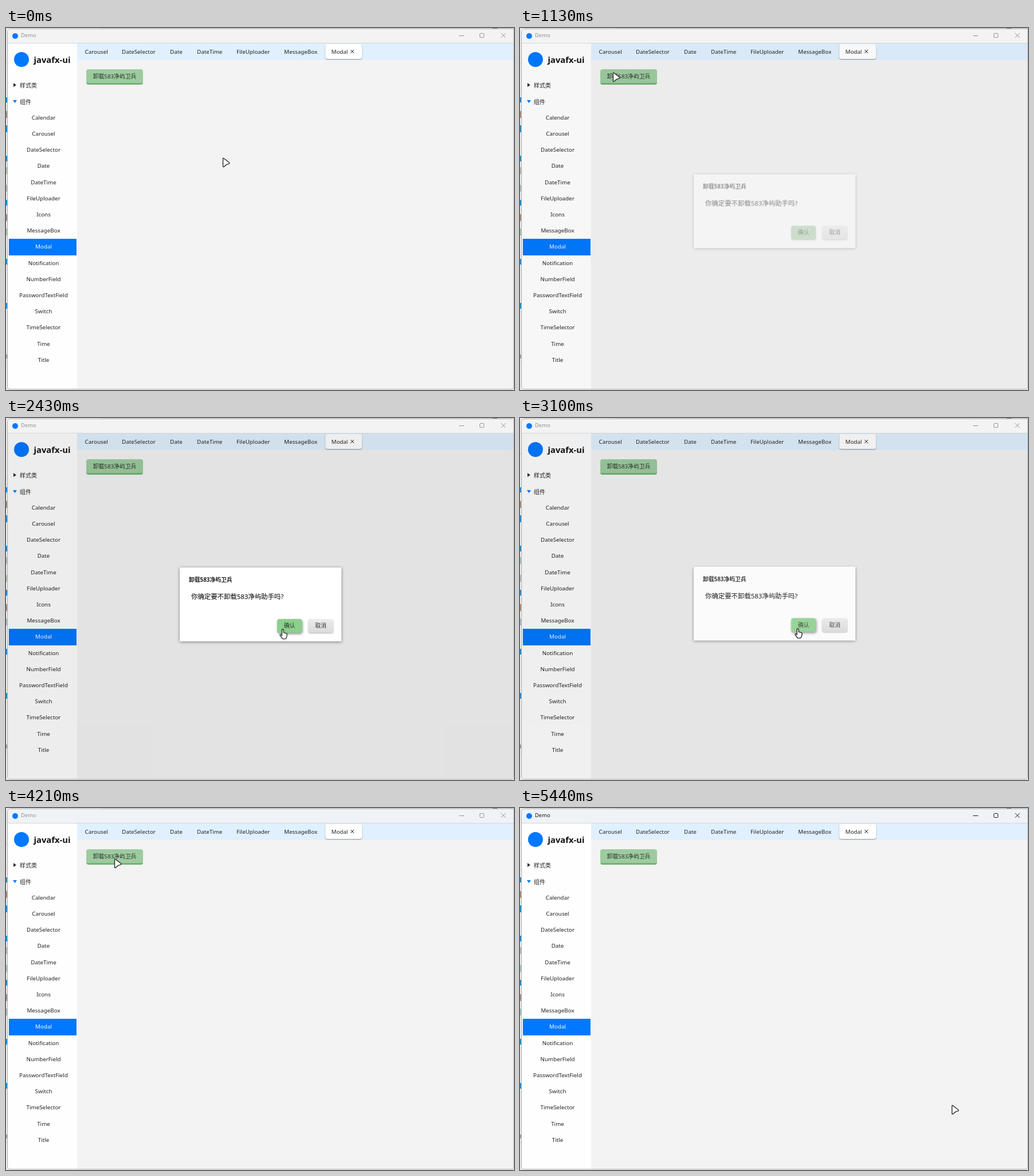
These frames come from a looping animation (886 px wide and 632 px high, 5490 ms). An HTML page:

```html
<!DOCTYPE html>
<html lang="zh-CN">
<head>
<meta charset="utf-8">
<title>Demo</title>
<style>
:root { --loop: 5490ms; --blue: #0078ff; }
html, body { margin: 0; width: 100%; height: 100%; overflow: hidden; }
body {
  position: relative; background: #eaeaea; color: #222;
  font: 9.8px/20px "Noto Sans", "Noto Sans CJK SC", "Noto Sans CJK", sans-serif;
  white-space: nowrap;
}
body *, body *::after { box-sizing: border-box; }
.abs, .abs > svg { position: absolute; }
ul { margin: 0; padding: 0; list-style: none; }

.window {
  left: 2px; top: 1px; width: 884px; height: 630px;
  border: 1px solid #b4b4b4; border-radius: 6px 0 5px 5px; background: #f3f3f3;
  overflow: hidden;
}
.bar {
  left: 3px; top: 2px; width: 882px; height: 25px;
  border-bottom: 1px solid #d6d6d6; border-radius: 5px 0 0 0; background: #f3f3f3;
  animation: tint var(--loop) step-end infinite;
}
.caption { color: #929292; animation: focus var(--loop) step-end infinite; }
.caption b { left: 26px; top: 3px; font-weight: 400; font-size: 9.4px; }
.dot { border-radius: 50%; background: var(--blue); }

.side { left: 4px; top: 27px; width: 120px; height: 603px; background: #fefefe; border-radius: 0 0 0 4px; }
.brand { left: 48.5px; top: 45px; font-size: 14.8px; font-weight: 700; color: #111; }
.group { left: 24px; font-size: 10px; }
.menu { left: 5px; top: 142.9px; width: 118px; }
.menu li { height: 28.2px; line-height: 28.2px; padding-left: 3px; text-align: center; }
.menu .on { background: var(--blue); color: #fff; }

.tabs { left: 124px; top: 27px; width: 761px; height: 29px; background: #e0f0fe; }
.tabs li { position: absolute; top: 5px; }
.tabs .on {
  left: 433px; top: 1px; width: 64px; height: 26px; padding-left: 10.5px; line-height: 27px;
  background: #fff; border-radius: 4px; box-shadow: 0 1px 2px #0006;
}

.btn {
  border-radius: 4px; text-align: center; color: #2a332a;
  background: #9dcb9f;
}
.unload { left: 140px; top: 72px; width: 99px; height: 27px; line-height: 25px; border-bottom: 3px solid #70b474; }

.dim {
  --rise: 0px;
  left: 3px; top: 27px; width: 882px; height: 603px; background: #00000011;
  border-radius: 0 0 5px 5px;
  animation: open var(--loop) linear infinite;
}
.modal {
  --rise: -10px;
  left: 303px; top: 261px; width: 282px; height: 129px; background: #fff;
  box-shadow: 0 1px 5px #0007;
  animation: open var(--loop) linear infinite;
}
.modal h1 { left: 16px; top: 12px; margin: 0; font-size: 9.8px; }
.modal p { left: 20px; top: 41px; margin: 0; font-size: 11.4px; color: #000; }
.modal .btn { top: 90px; width: 43px; height: 24px; line-height: 24px; box-shadow: 0 1px 2px #0005; }
.ok { left: 170px; animation: ok var(--loop) step-end infinite; }
.modal .no {
  left: 224px; width: 44px; background: linear-gradient(#ececec, #dadada);
  animation: no var(--loop) step-end infinite;
}

.cursor {
  left: 0; top: 0; width: 20px; height: 21px; overflow: hidden;
  animation: move var(--loop) linear infinite;
}
.cursor svg { left: 0; top: 0; animation: swap var(--loop) step-end infinite; }

@keyframes move {
  0%, .6% { transform: translate(377px, 226px); }
  4.37%, 6.6% { transform: translate(127px, 29px); }
  10% { transform: translate(173px, 78px); }
  13.2%, 33.3% { transform: translate(161px, 77px); }
  33.5%, 34.2% { transform: translate(201px, 119px); }
  39.7%, 42.2% { transform: translate(475px, 370px); }
  45.9%, 63.4% { transform: translate(479px, 367px); }
  65.5% { transform: translate(440px, 268px); }
  67.5% { transform: translate(360px, 190px); }
  70% { transform: translate(270px, 138px); }
  72.6%, 77.4% { transform: translate(188px, 88px); }
  85.4%, 86.2% { transform: translate(538px, 395px); }
  93.4%, 96% { transform: translate(545px, 358px); }
  98.9%, 100% { transform: translate(752px, 518px); }
}
/* arrow <-> hand */
@keyframes swap {
  0%, 18.2%, 61%, 75%, 96% { transform: none; }
  9%, 39%, 72.2%, 91.5% { transform: translateX(-24px); }
}
@keyframes open {
  0%, 19.3%, 60.1%, 77.5%, 98.9%, 100% { opacity: 0; transform: translateY(var(--rise)); }
  22.4%, 55.87%, 81%, 95.8% { opacity: 1; transform: none; }
}
@keyframes focus {
  0%, 75.5% { color: #929292; }
  60.84%, 98.8% { color: #161616; }
}
@keyframes tint {
  0%, 78% { background: #f3f3f3; }
  60.84%, 98.8% { background: #eff3f8; }
}
@keyframes ok {
  0%, 61% { background: #9dcb9f; box-shadow: 0 1px 2px #0005; }
  39% { background: #8bd08c; box-shadow: 1px 2px 4px #0007; }
}
@keyframes no {
  0%, 99% { box-shadow: 0 1px 2px #0005; }
  91.5% { box-shadow: 1px 2px 4px #0007; }
}
</style>
</head>
<body>
<svg class="abs" style="left:0;top:0" width="886" height="632">
  <path d="M166 .5h720" stroke="#d8d8d8"/>
  <path d="M849 .5h8" stroke="#777"/>
  <path d="M0 62.5h3M0 107.5h3M0 583.5h3" stroke="#cfcfcf"/>
  <path d="M1 121v9M1 170v12M1 223v10M1 300v10M1 403v10M1 480v10" stroke="#2688c9" stroke-width="2"/>
  <path d="M1 145v12M1 325v12" stroke="#a98b7c" stroke-width="2"/>
  <path d="M1 243v12M1 274v12M1 350v12" stroke="#a9bdbb" stroke-width="2"/>
  <path d="M1 570v7" stroke="#555"/>
</svg>

<div class="abs window"></div>
<div class="abs bar"></div>
<div class="caption">
  <b class="abs">Demo</b>
  <svg class="abs" style="left:780px;top:0" width="100" height="26" fill="none" stroke="currentColor">
    <path d="M10 13.5h9M83.5 9l8 8m0-8l-8 8"/>
    <rect x="46.5" y="9.5" width="7" height="7" rx="1"/>
  </svg>
</div>
<i class="abs dot" style="left:10.5px;top:8.5px;width:10px;height:10px"></i>

<div class="abs side"></div>
<i class="abs dot" style="left:13.5px;top:41.5px;width:26px;height:26px"></i>
<div class="abs brand">javafx-ui</div>
<svg class="abs" style="left:10px;top:90px" width="12" height="46">
  <path d="M3 6l5 3.5-5 3.5z" fill="#333"/>
  <path d="M2 36h7l-3.5 5z" fill="#0078ff"/>
</svg>
<div class="abs group" style="top:90px">样式类</div>
<div class="abs group" style="top:119px">组件</div>
<ul class="abs menu">
  <li>Calendar</li><li>Carousel</li><li>DateSelector</li><li>Date</li>
  <li>DateTime</li><li>FileUploader</li><li>Icons</li><li>MessageBox</li>
  <li class="on">Modal</li><li>Notification</li><li>NumberField</li><li>PasswordTextField</li>
  <li>Switch</li><li>TimeSelector</li><li>Time</li><li>Title</li>
</ul>

<ul class="abs tabs">
  <li style="left:13.5px">Carousel</li>
  <li style="left:78px">DateSelector</li>
  <li style="left:162px">Date</li>
  <li style="left:209px">DateTime</li>
  <li style="left:278px">FileUploader</li>
  <li style="left:361px">MessageBox</li>
  <li class="on">Modal
    <svg class="abs" style="left:43px;top:9px" width="8" height="8"><path d="M1 1l6 6m0-6l-6 6" stroke="#222"/></svg>
  </li>
</ul>
<div class="abs btn unload">卸载583净屿卫兵</div>

<div class="abs dim"></div>
<div class="abs modal">
  <h1 class="abs">卸载583净屿卫兵</h1>
  <p class="abs">你确定要不卸载583净屿助手吗?</p>
  <div class="abs btn ok">确认</div>
  <div class="abs btn no">取消</div>
</div>

<div class="abs cursor">
  <svg width="48" height="21" fill="#fff" stroke="#2c2c2c" stroke-width="1.4" stroke-linejoin="round">
    <path d="M1.5 2Q1.5 .6 2.8 1.5L12.3 8.8Q13.4 10.4 11.6 11.2L7.6 12.4 3.2 16.2Q1.5 17.2 1.5 15.4Z"/>
    <path d="M28 9.6V2.2a1.5 1.5 0 0 1 3 0V6.6L35 7.4Q37.4 8 37 10.2L36.2 14Q35.6 17.4 33 17.4H30.6Q29.2 17.4 28.2 16L25 11.6Q24.5 9.6 26.2 9.6L28 11.4Z"/>
  </svg>
</div>
</body>
</html>
```
